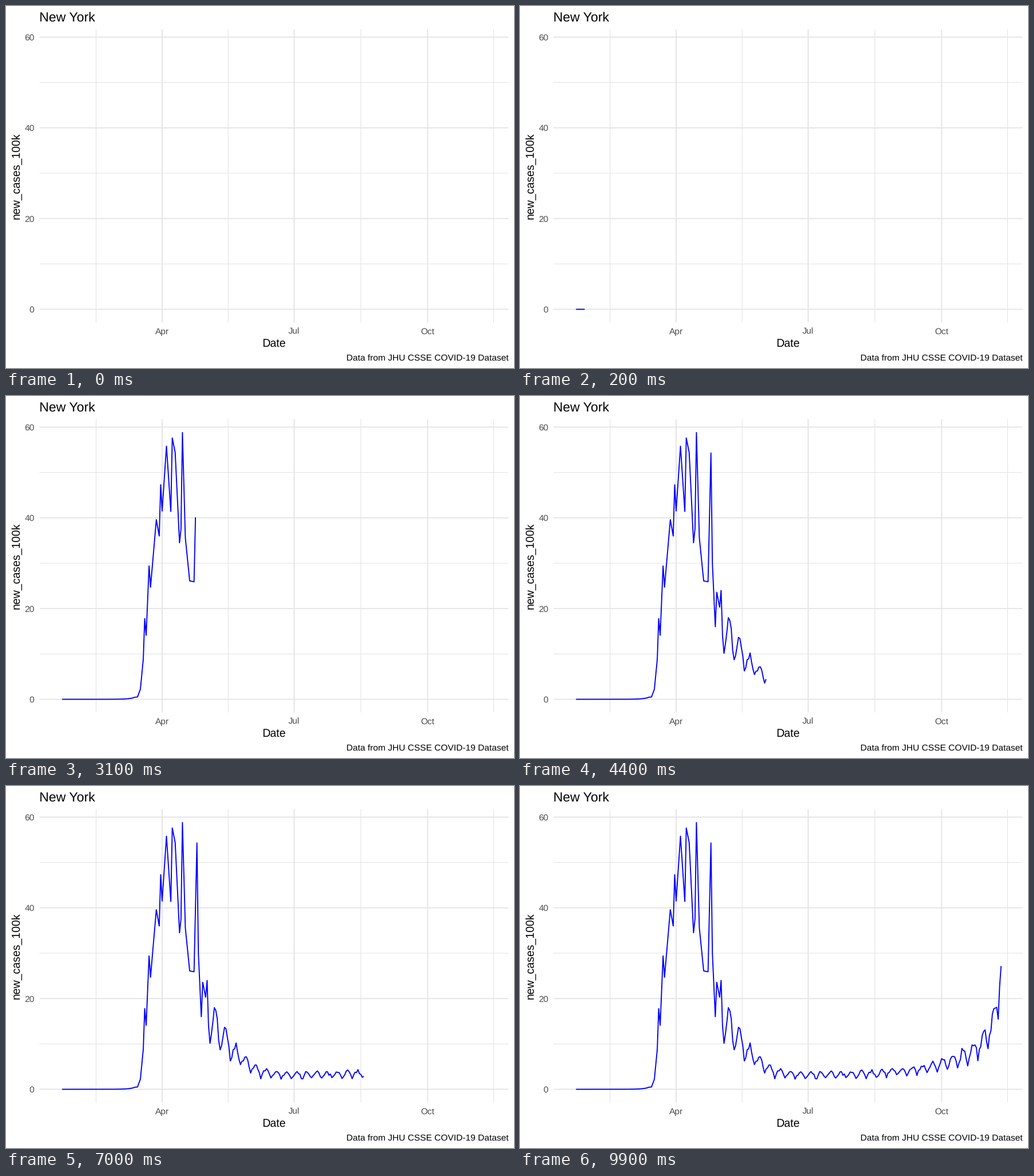
Animation of 885x632 px, one loop 10000 ms. Source, as a matplotlib script:

```python
import numpy as np
import matplotlib.pyplot as plt
from matplotlib.animation import FuncAnimation
from matplotlib.patches import Rectangle

W, H, DPI = 885, 632, 64
PT = 72 / DPI  # points per pixel
FRAMES, INTERVAL = 100, 100
LEFT, RIGHT, TOP, BOTTOM = 58.3, 875.3, 40.5, 552.5
GRID, AXIS_TEXT = "#e5e5e5", "#4d4d4d"
MAJOR, MINOR = 1.9, 1.1
TITLE, AXIS, SMALL = 23.0, 19.5, 15.45
LAST_DAY = 293

plt.rcParams.update({"font.family": "Liberation Sans", "text.hinting": "none"})

# Turning points of the first wave: (day, cases)
WAVE = [
    (50, 0.45), (52, 0.5), (54, 2.2), (56, 8.8), (57, 17.8), (58, 14.1),
    (60, 29.4), (61, 24.7), (65, 39.6), (67, 36), (68, 47.3), (69, 41.5),
    (72, 55.8), (75, 41.4), (76, 57.6), (78, 54.4), (81, 34.5), (82, 37.5),
    (83, 58.8), (85, 35.6), (88, 26.1), (91, 25.9), (93, 54.3), (94, 30),
    (96, 16), (97, 23.6), (99, 20.3), (100, 24),
]


def px(day):
    """Days since 23 January to pixels."""
    return 97.6 + 2.5273 * np.asarray(day)


def py(cases):
    return 529.5 - 7.92 * np.asarray(cases)


def daily_cases(day):
    """Slow onset, first wave, then a smooth trend with a weekly rhythm."""
    onset = 0.4 * np.exp((day - 50) / 4)
    wave = np.interp(day, *zip(*WAVE))

    decline = np.exp(-((day - 90) / 28) ** 2)
    rise = 1.1 * np.exp((day - 230) / 28) + 12 * np.exp((day - LAST_DAY) / 4.5)
    trend = 3.1 + 15 * decline + rise
    swing = 0.17 + 0.15 * decline
    week = 1 + swing * np.cos(2 * np.pi * (day - 0.8) / 7) - 0.12 * (day % 7 == 4)
    jitter = np.random.default_rng(4).normal(0, 0.05, len(day))
    tail = trend * (week + jitter)

    return np.select([day < 50, day <= 100], [onset, wave], tail)


days = np.arange(LAST_DAY + 1)
xs, ys = px(days), py(daily_cases(days))

fig = plt.figure(figsize=(W / DPI, H / DPI), dpi=DPI, facecolor="white")
ax = fig.add_axes([0, 0, 1, 1])
ax.set(xlim=(0, W), ylim=(H, 0))
ax.axis("off")


def label(x, y, text, size, color="black", ha="center", **kw):
    ax.text(x, y, text, fontsize=size * PT, color=color, ha=ha,
            va="baseline", **kw)


def line(x, y, width, color, zorder):
    return ax.plot(x, y, color=color, lw=width * PT, snap=False, zorder=zorder,
                   solid_capstyle="butt", solid_joinstyle="round")[0]


def grid_x(day, width):
    line([px(day)] * 2, [TOP, BOTTOM], width, GRID, 1)


def grid_y(cases, width):
    line([LEFT, RIGHT], [py(cases)] * 2, width, GRID, 1)


for day in (23.5, 114.5, 206, 297.5):
    grid_x(day, MINOR)
for cases in (10, 30, 50):
    grid_y(cases, MINOR)
for day, month in ((69, "Apr"), (160, "Jul"), (252, "Oct")):
    grid_x(day, MAJOR)
    label(px(day), 572.8, month, SMALL, AXIS_TEXT)
for cases in (0, 20, 40, 60):
    grid_y(cases, MAJOR)
    label(49.5, py(cases) + 5.6, str(cases), SMALL, AXIS_TEXT, ha="right")

label(58.0, 26.5, "New York", TITLE, ha="left")
label(466.8, 594.5, "Date", AXIS)
label(23.7, 296.5, "new_cases_100k", AXIS, rotation=90, rotation_mode="anchor")
label(875.3, 619.6, "Data from JHU CSSE COVID-19 Dataset", SMALL, ha="right")

curve = line([], [], MAJOR, "blue", 2)
shade = ax.add_patch(Rectangle((-5, -5), W + 10, H + 10, fc="black", lw=0,
                               alpha=1 - 40 / 255, zorder=10, visible=False))


def draw(i):
    end = min(LAST_DAY, round(2.97 * i))
    n = end + 1 if i else 0
    curve.set_data(xs[:n], ys[:n])
    shade.set_visible(i == 1)  # one dark flash as the line starts
    return curve, shade


anim = FuncAnimation(fig, draw, frames=FRAMES, interval=INTERVAL,
                     repeat=True, repeat_delay=0, blit=False)
plt.show()
```
